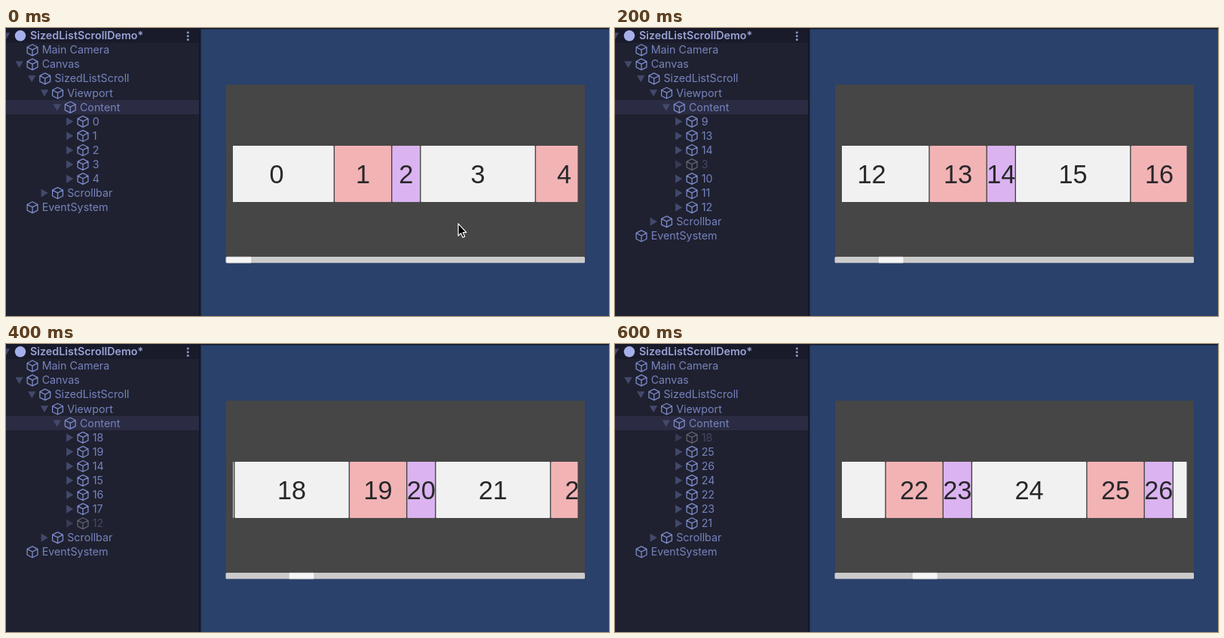
These frames come from a looping animation (800x384 px, 700 ms). An HTML page:

```html
<!DOCTYPE html>
<html lang="en">
<head>
<meta charset="utf-8">
<title>Sized list scroll</title>
<style>
  html, body { margin: 0; width: 100%; height: 100%; overflow: hidden; background: #29416b; }
  svg { display: block; }
  .tree text { font: 14.3px Inter, sans-serif; fill: #7683bd; }
  .tree .title { font-weight: 600; fill: #98a2d4; }
  .cube { fill: none; stroke: #7d8bcb; stroke-width: 1.3; stroke-linejoin: round; }
  .fold { fill: #43496b; }
  .tree .off text { fill: #444960; }
  .off .cube { stroke: #5f626c; }
  .off .fold { fill: #363b55; }
  .strip text { font: 34.3px "Liberation Sans", Arial, sans-serif; fill: #28282a; text-anchor: middle; }
</style>
</head>
<body>
<svg width="800" height="384" viewBox="0 0 800 384">
  <defs>
    <path id="cube" d="M0-7.4 6.9-3.9V3.9L0 7.4-6.9 3.9V-3.9ZM-6.9-3.9 0-.3 6.9-3.9M0-.3V7.4"/>
    <path id="open" d="M-5.2-4.3H5.2L0 4.7Z"/>
    <path id="shut" d="M-4.4-5.6 4.8 0-4.4 5.6Z"/>
  </defs>

  <rect width="257" height="384" fill="#1f2130"/>
  <rect width="257" height="20" fill="#191b2b"/>
  <rect y="96" width="257" height="19" fill="#2b2c43"/>
  <g class="tree">
    <use href="#open" class="fold" x="0" y="10.5"/>
    <circle cx="19" cy="10.3" r="7.2" fill="#a5b0ea"/>
    <text class="title" x="32" y="15.2">SizedListScrollDemo*</text>
    <g fill="#8f98c6">
      <circle cx="241.3" cy="6" r="1.5"/>
      <circle cx="241.3" cy="10.7" r="1.5"/>
      <circle cx="241.3" cy="15.4" r="1.5"/>
    </g>
    <g id="rows"></g>
  </g>
  <path d="M0 0H800V1.5H258.5V384H256V1.5H0Z" fill="#161827"/>

  <rect x="292" y="75.5" width="476" height="237" fill="#464646"/>
  <svg class="strip" x="301" y="157" width="457.5" height="75" viewBox="301 157 457.5 75">
    <g id="strip"></g>
  </svg>
  <rect x="291.5" y="305" width="476.5" height="8.3" rx="1.5" fill="#cbcbcb"/>
  <rect id="handle" y="305" width="34" height="8.3" rx="1.5" fill="#f5f5f5" stroke="#aaa" stroke-width=".6"/>
  <path id="cursor" d="M600 260.8V277L603.6 273.6 606 279.2 608.6 278.1 606.2 272.6H610.8Z"
        fill="#000" stroke="#fff" stroke-width="1.2" stroke-linejoin="round"/>
</svg>

<script>
const STEP = 100;
const GAP = 1.4;
const KINDS = [
  { at: 0, size: 152.6, fill: "#f1f1f1" },
  { at: 152.6, size: 76.3, fill: "#f2b3b5" },
  { at: 228.9, size: 38.1, fill: "#dbb3f0" }
];
const PERIOD = 267;

// scroll: distance travelled by the strip; a leading "-" marks a pooled, inactive item
const POOLS = ["0 1 2 3 4", "9 13 14 -3 10 11 12", "18 19 14 15 16 17 -12",
               "18 19 20 -15 22 23 21", "-18 25 26 24 22 23 21"];
const POSES = [
  { scroll: 17.5, pool: 0 },
  { scroll: 769.5, pool: 0 },
  { scroll: 1104, pool: 1 },
  { scroll: 1378, pool: 2 },
  { scroll: 1599.5, pool: 2 },
  { scroll: 1807.5, pool: 3 },
  { scroll: 1963, pool: 4 }
];

const $ = id => document.getElementById(id);

function cell(_, i) {
  const kind = KINDS[i % 3];
  const x = 301 + Math.floor(i / 3) * PERIOD + kind.at;
  const w = kind.size - GAP;
  return `<rect x="${x}" y="157" width="${w}" height="75" rx="1" fill="${kind.fill}"/>` +
         `<text x="${x + w / 2}" y="207">${i}</text>`;
}

function row([label, depth, fold, off], i) {
  const x = 18.3 + depth * 16.75;
  const y = 29.4 + i * 19.07;
  const arrow = fold ? `<use href="#${fold}" class="fold" x="${x - 17.5}" y="${y}"/>` : "";
  return `<g class="${off ? "off" : ""}">${arrow}` +
         `<use href="#cube" class="cube" x="${x}" y="${y}"/>` +
         `<text x="${x + 12.6}" y="${y + 4.9}">${label}</text></g>`;
}

function tree(pool) {
  const items = pool.split(" ").map(s => [s.replace("-", ""), 5, "shut", s[0] === "-"]);
  return [
    ["Main Camera", 1],
    ["Canvas", 1, "open"],
    ["SizedListScroll", 2, "open"],
    ["Viewport", 3, "open"],
    ["Content", 4, "open"],
    ...items,
    ["Scrollbar", 3, "shut"],
    ["EventSystem", 1]
  ].map(row).join("");
}

$("strip").innerHTML = Array.from({ length: 30 }, cell).join("");

const start = performance.now();
let shown = -1;

function draw() {
  const step = Math.floor((performance.now() - start) / STEP) % POSES.length;
  if (step !== shown) {
    const { scroll, pool } = POSES[step];
    $("strip").setAttribute("transform", `translate(${-scroll} 0)`);
    $("handle").setAttribute("x", 291.1 + scroll * 0.0525);
    $("cursor").style.display = step ? "none" : "";
    $("rows").innerHTML = tree(POOLS[pool]);
    shown = step;
  }
  requestAnimationFrame(draw);
}
draw();
</script>
</body>
</html>
```
